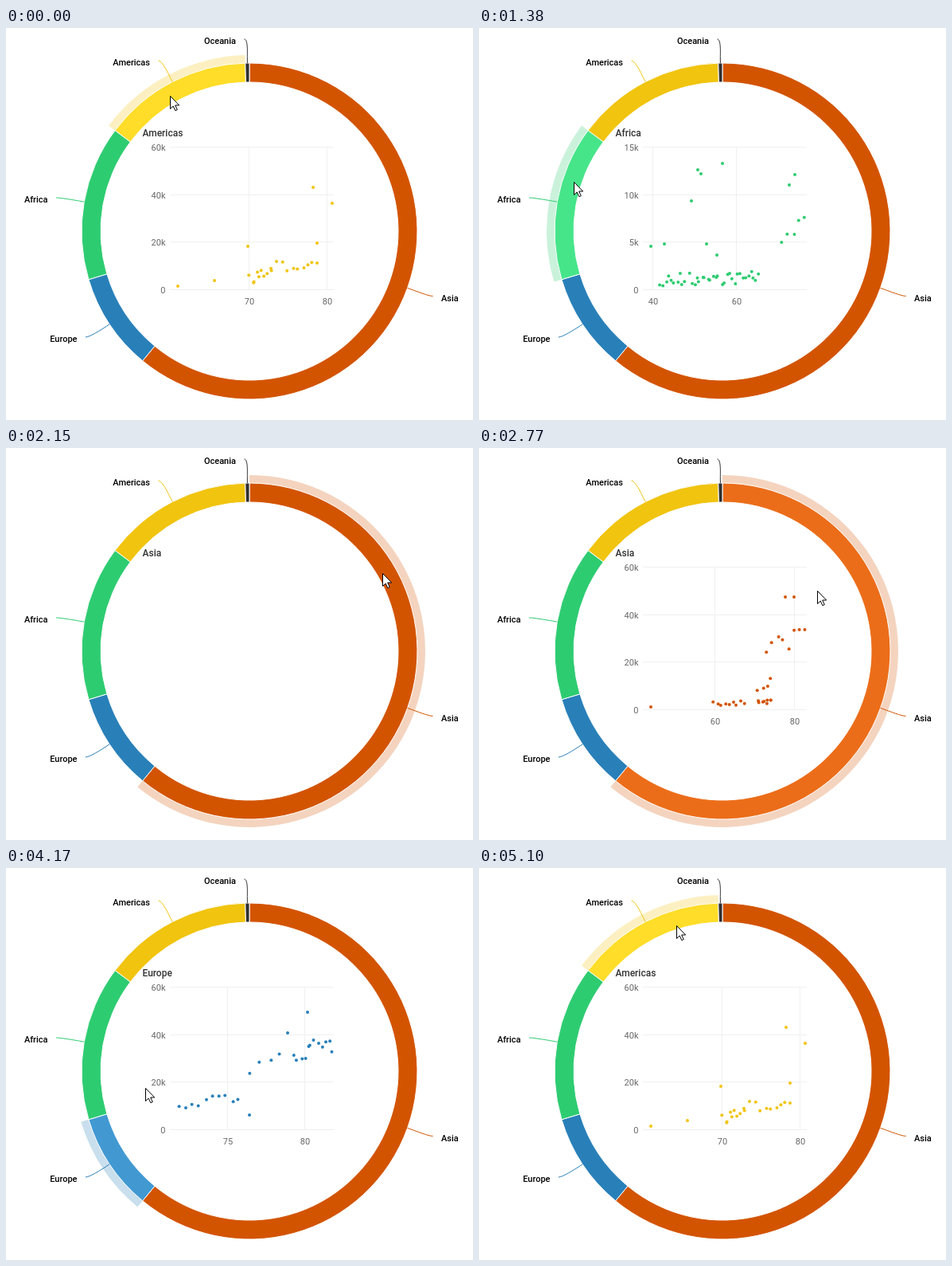
These frames come from a looping animation (587x492 px, 6190 ms). An HTML page:

```html
<!DOCTYPE html>
<html lang="en">
<head>
<meta charset="utf-8">
<title>Regions</title>
<style>
  html, body { margin: 0; width: 100%; height: 100%; overflow: hidden; background: #fff; }
  svg { display: block; width: 587px; height: 492px; font-family: Roboto, Arial, sans-serif; }
  .label { font-size: 11px; font-weight: 500; fill: #000; }
  .title { font-size: 12px; font-weight: 500; fill: #333; }
  .axis { font-size: 11px; fill: #666; }
  .grid { stroke: #f0f0f0; fill: none; }
  .slice { stroke: #fff; stroke-linejoin: round; }
  .link { fill: none; }
  .halo { opacity: .25; }
  .end { text-anchor: end; }
  .mid { text-anchor: middle; }
</style>
</head>
<body>
<svg id="stage" viewBox="0 0 587 492"></svg>
<script>
const LOOP = 6190;
const CX = 306, CY = 255, R = 211, INNER = 187, HALO = 221;

// pop: millions; link: connector start; ticks: [x, text]
// clouds: [count, x0, y0, x1, y1, spread], dots strewn along a line
const regions = [
  { name: 'Asia', pop: 3812, color: '#d35400', hot: '#ec6d19', link: [536.5, 336.5],
    top: 60, ticks: [[296.5, 60], [396.5, 80]],
    clouds: [[1, 216, 325], [9, 295, 321, 333, 321, 4], [8, 350, 317, 368, 318, 4],
      [4, 350, 306, 368, 291, 4], [8, 361, 256, 410, 230, 13], [2, 385, 187, 396, 187]] },
  { name: 'Europe', pop: 586, color: '#2980b9', hot: '#4299d2', link: [100, 388],
    top: 60, ticks: [[278.5, 75], [375.5, 80]],
    clouds: [[10, 216, 300, 293, 284, 10], [4, 308, 260, 343, 242, 12], [12, 362, 233, 410, 222, 11],
      [1, 306, 310], [2, 354, 207, 379, 181]] },
  { name: 'Africa', pop: 929.5, color: '#2ecc71', hot: '#47e58a', link: [63, 213],
    top: 15, ticks: [[218.5, 40], [323.5, 60]],
    clouds: [[37, 229, 316, 352, 313, 8], [2, 216, 274, 233, 271], [2, 286, 271, 299, 285],
      [2, 267, 217, 306, 170], [2, 275, 178, 279, 183], [5, 382, 273, 410, 236, 5],
      [2, 390, 197, 397, 184]] },
  { name: 'Americas', pop: 899, color: '#f1c40f', hot: '#ffdd28', link: [191.5, 41],
    top: 60, ticks: [[305.5, 70], [403.5, 80]],
    clouds: [[2, 216, 324, 262, 317], [10, 307, 314, 334, 307, 7], [9, 342, 300, 391, 295, 7],
      [2, 304, 274, 391, 270], [2, 386, 200, 410, 220]] },
  { name: 'Oceania', pop: 24.5, color: '#2f2e30', link: [299.5, 14] }
];

// Bursts of refreshes: start, step, count
const bursts = [[590, 158, 7], [1690, 153, 5], [2770, 155, 6], [4170, 155, 7]];

// Pointer waypoints: time, x, y
const path = [[0, 206, 85], [430, 206, 85], [1380, 119, 193], [1540, 119, 193], [2150, 474, 157],
  [2610, 481, 155], [2770, 425, 179], [3390, 138, 355], [4020, 138, 355], [4170, 175, 276],
  [4480, 118, 222], [4790, 158, 128], [5100, 248, 72], [LOOP, 248, 72]];

function add(parent, tag, attrs, text) {
  const el = document.createElementNS('http://www.w3.org/2000/svg', tag);
  for (const key in attrs) el.setAttribute(key, attrs[key]);
  if (text !== undefined) el.textContent = text;
  parent.appendChild(el);
  return el;
}

const lerp = (a, b, k) => a + (b - a) * k;

// Seeded random numbers from -1 to 1
let seed = 7;
function noise() {
  seed = (seed * 16807) % 2147483647;
  return seed / 2147483647 * 2 - 1;
}

// Point on a circle, with the angle in turns clockwise from the top
function polar(r, turn) {
  const a = turn * 2 * Math.PI;
  return [CX + r * Math.sin(a), CY - r * Math.cos(a)];
}

function band(r0, r1, from, to) {
  const big = to - from > .5 ? 1 : 0;
  return `M${polar(r1, from)}A${r1} ${r1} 0 ${big} 1 ${polar(r1, to)}` +
    `L${polar(r0, to)}A${r0} ${r0} 0 ${big} 0 ${polar(r0, from)}Z`;
}

function drawCloud(parent, color, [count, x0, y0, x1 = x0, y1 = y0, spread = 0]) {
  for (let i = 0; i < count; i++) {
    const k = i / Math.max(1, count - 1);
    const cx = lerp(x0, x1, k) + noise() * Math.min(spread, 2);
    const cy = lerp(y0, y1, k) + noise() * spread;
    add(parent, 'circle', { cx, cy, r: 2, fill: color });
  }
}

function drawChart(parent, reg) {
  const g = add(parent, 'g');
  for (let i = 0; i < 4; i++) {
    const y = 328.5 - Math.round(i * 59.67);
    const value = reg.top * i / 3;
    add(g, 'path', { class: 'grid', d: `M206 ${y}H412` });
    add(g, 'text', { class: 'axis end', x: 200.5, y: y + 4.5 }, value ? value + 'k' : 0);
  }
  for (const [x, text] of reg.ticks) {
    add(g, 'path', { class: 'grid', d: `M${x} 149V328` });
    add(g, 'text', { class: 'axis mid', x: x + .5, y: 347 }, text);
  }
  for (const cloud of reg.clouds) drawCloud(g, reg.color, cloud);
  return g;
}

const stage = document.getElementById('stage');
const halos = add(stage, 'g');
const slices = add(stage, 'g');
const charts = add(stage, 'g');
const title = add(stage, 'text', { class: 'title', x: 171.5, y: 136 });
const total = regions.reduce((sum, reg) => sum + reg.pop, 0);

let from = 0;
for (const reg of regions) {
  const to = from + reg.pop / total, mid = (from + to) / 2;
  const side = mid < .5 ? 1 : -1;
  const [x, y] = reg.link;
  reg.to = to;
  reg.halo = add(halos, 'path', { class: 'halo', d: band(R - 1, HALO, from, to), fill: reg.color });
  reg.slice = add(slices, 'path', { class: 'slice', d: band(INNER, R, from, to), fill: reg.color });
  add(stage, 'path', { class: 'link', stroke: reg.color,
    d: `M${x} ${y}C${x - side * 5} ${y} ${polar(R + 12, mid)} ${polar(R + 6, mid)}L${polar(R, mid)}` });
  add(stage, 'text', { class: side > 0 ? 'label' : 'label end', x: x + side * 10.5, y: y + 6 }, reg.name);
  if (reg.clouds) reg.chart = drawChart(charts, reg);
  from = to;
}

const pointer = add(stage, 'path', { fill: '#fff', stroke: '#000',
  d: 'M.5 .5V16.5L4.2 13 6.8 18.7 9.3 17.6 6.7 12H11.7Z' });

function pointerAt(t) {
  const i = path.findIndex(p => p[0] > t);
  const [t0, x0, y0] = path[i - 1], [t1, x1, y1] = path[i];
  const k = (t - t0) / (t1 - t0);
  return [Math.round(lerp(x0, x1, k)), Math.round(lerp(y0, y1, k))];
}

// Region whose slice lies under a point, if any
function hit([x, y]) {
  const dx = x - CX, dy = y - CY, r = Math.hypot(dx, dy);
  if (r < INNER || r > R) return;
  const turn = (Math.atan2(dx, -dy) / (2 * Math.PI) + 1) % 1;
  return regions.find(reg => turn < reg.to);
}

// A region stays active until another is entered; its chart is blank for one refresh.
let active = hit(pointerAt(0));
const states = [{ time: 0, pos: pointerAt(0), active, ready: true }];
for (const [start, step, count] of bursts) {
  for (let i = 0; i < count; i++) {
    const time = start + i * step, pos = pointerAt(time);
    const next = hit(pos) || active;
    states.push({ time, pos, active: next, ready: next === active });
    active = next;
  }
}

const show = (el, on) => el.setAttribute('visibility', on ? 'visible' : 'hidden');
let drawn;

function render(time) {
  const state = states.filter(s => s.time <= time).pop();
  if (state === drawn) return;
  drawn = state;
  for (const reg of regions) {
    const on = reg === state.active, full = on && state.ready;
    show(reg.halo, on);
    if (reg.chart) show(reg.chart, full);
    reg.slice.setAttribute('fill', full ? reg.hot : reg.color);
  }
  title.textContent = state.active.name;
  pointer.setAttribute('transform', `translate(${state.pos})`);
}

const start = performance.now();
function frame() {
  render(Math.max(0, performance.now() - start) % LOOP);
  requestAnimationFrame(frame);
}
frame();
</script>
</body>
</html>
```
